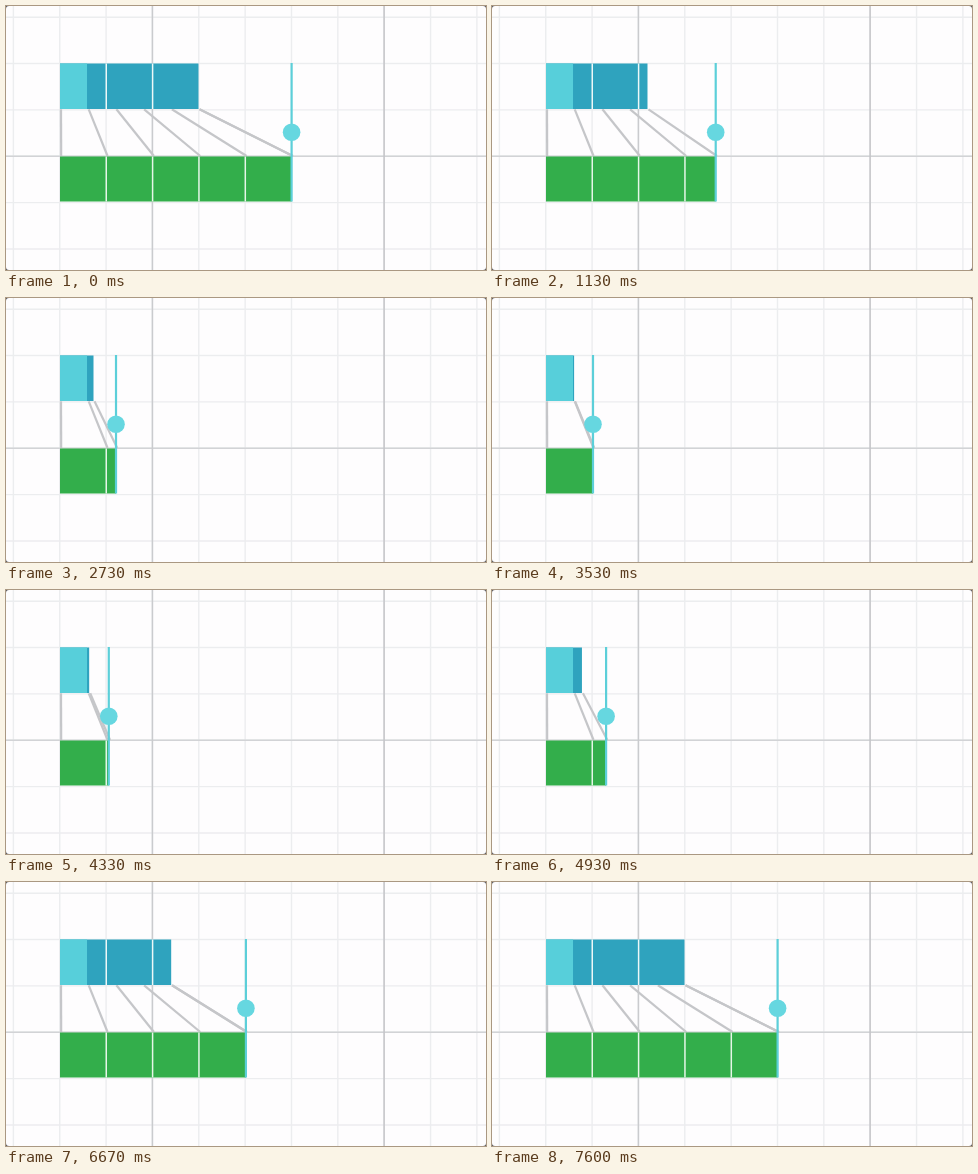
Recreate the animation shown at these times as an HTML page with a canvas. Size 480 px wide and 264 px high, loop 7.67 s.

```html
<!DOCTYPE html>
<html lang="en">
<head>
<meta charset="utf-8">
<title>Ratio bars</title>
<style>
  html, body { margin: 0; width: 100%; height: 100%; overflow: hidden; background: #fefdfe; }
  canvas { display: block; }
</style>
</head>
<body>
<canvas id="stage" width="480" height="264"></canvas>
<script>
const ctx = document.getElementById('stage').getContext('2d');
const W = 480, H = 264, LOOP = 7670, STEP = 200 / 3;
const LEFT = 54, UNIT = 46.35, RATIO = 0.598;
const TOP_Y = 57.5, TOP_END = 103, LOW_Y = 150.5, LOW_END = 195.5;

// Slider path: [ms, x]
const path = [
  [0, 285.6], [400, 275], [800, 246.5], [1130, 224], [1600, 170.5], [2070, 137],
  [2400, 121], [2800, 108.5], [3200, 102.5], [3530, 101], [3800, 101], [4370, 103],
  [4800, 111], [4930, 114], [5600, 143], [5870, 159.3], [6400, 211],
  [6800, 253], [7200, 283], [7600, 285.6], [LOOP, 285.6]
];

const secant = path.slice(1).map((p, i) => (p[1] - path[i][1]) / (p[0] - path[i][0]));

// Monotone tangents keep the drag free of overshoot
const tangent = path.map((_, i) => {
  const a = secant[i - 1], b = secant[i];
  return a * b > 0 ? 2 * a * b / (a + b) : 0;
});

function sliderAt(t) {
  let i = 0;
  while (i < path.length - 2 && t >= path[i + 1][0]) i++;
  const [t0, x0] = path[i], [t1, x1] = path[i + 1];
  const d = t1 - t0, u = (t - t0) / d, v = 1 - u;
  return x0 * (1 + 2 * u) * v * v + x1 * u * u * (3 - 2 * u)
    + d * u * v * (tangent[i] * v - tangent[i + 1] * u);
}

function rect(x0, y0, x1, y1, color) {
  ctx.fillStyle = color;
  ctx.fillRect(x0, y0, x1 - x0, y1 - y0);
}

function line(x0, y0, x1, y1, color, width) {
  ctx.strokeStyle = color;
  ctx.lineWidth = width;
  ctx.beginPath();
  ctx.moveTo(x0, y0);
  ctx.lineTo(x1, y1);
  ctx.stroke();
}

function drawGrid() {
  const minor = '#ecedef';
  for (let k = 0; k < 11; k++) {
    const x = 7.4 + k * UNIT;
    line(x, 0, x, H, minor, 1.4);
  }
  for (let k = 0; k < 6; k++) {
    const y = 11.2 + k * UNIT;
    line(0, y, W, y, minor, 1.4);
  }
  line(0, 150.2, W, 150.2, '#d2d3d6', 1.5);
  line(146.4, 0, 146.4, H, '#cacbce', 1.5);
  line(378.1, 0, 378.1, H, '#c4c4c8', 1.5);
}

function drawBars(x) {
  const topX = LEFT + (x - LEFT) * RATIO;
  const split = LEFT + UNIT * RATIO - 0.7;
  rect(LEFT, TOP_Y, topX, TOP_END, '#2fa3be');
  rect(LEFT, TOP_Y, Math.min(split, topX), TOP_END, '#57cfda');
  rect(LEFT, LOW_Y, x, LOW_END, '#33ae4b');
  for (let k = 1; k < 5; k++) {
    const cut = LEFT - 0.1 + k * UNIT;
    if (cut < topX - 0.5) line(cut, TOP_Y, cut, TOP_END, '#eef8f8', 1.5);
    if (cut < x - 1.5) line(cut, LOW_Y, cut, LOW_END, '#e6f6e8', 1.5);
  }
}

function drawLinks(x) {
  const link = w => line(LEFT + 1 + w * RATIO, 103.3, LEFT + 1.2 + w, 150, '#c5c6c9', 2.2);
  const width = x - LEFT;
  for (let k = 0; k * UNIT <= width + 0.5; k++) link(k * UNIT);
  link(width);
}

function drawSlider(x) {
  line(x, 57, x, 195.5, '#5ccfd9', 2.2);
  ctx.fillStyle = '#66d7e0';
  ctx.beginPath();
  ctx.arc(x, 126.2, 8.8, 0, Math.PI * 2);
  ctx.fill();
}

function drawCorners() {
  ctx.fillStyle = '#55565a';
  ctx.beginPath();
  ctx.rect(0, 0, W, H);
  ctx.roundRect(0, 0, W, H, 3);
  ctx.fill('evenodd');
}

function draw(t) {
  const x = sliderAt(t);
  rect(0, 0, W, H, '#fefdfe');
  drawGrid();
  drawLinks(x);
  drawBars(x);
  drawSlider(x);
  drawCorners();
}

function tick() {
  const t = performance.now() % LOOP;
  draw(Math.floor((t + 3.5) / STEP) * STEP);
  requestAnimationFrame(tick);
}
tick();
</script>
</body>
</html>
```
